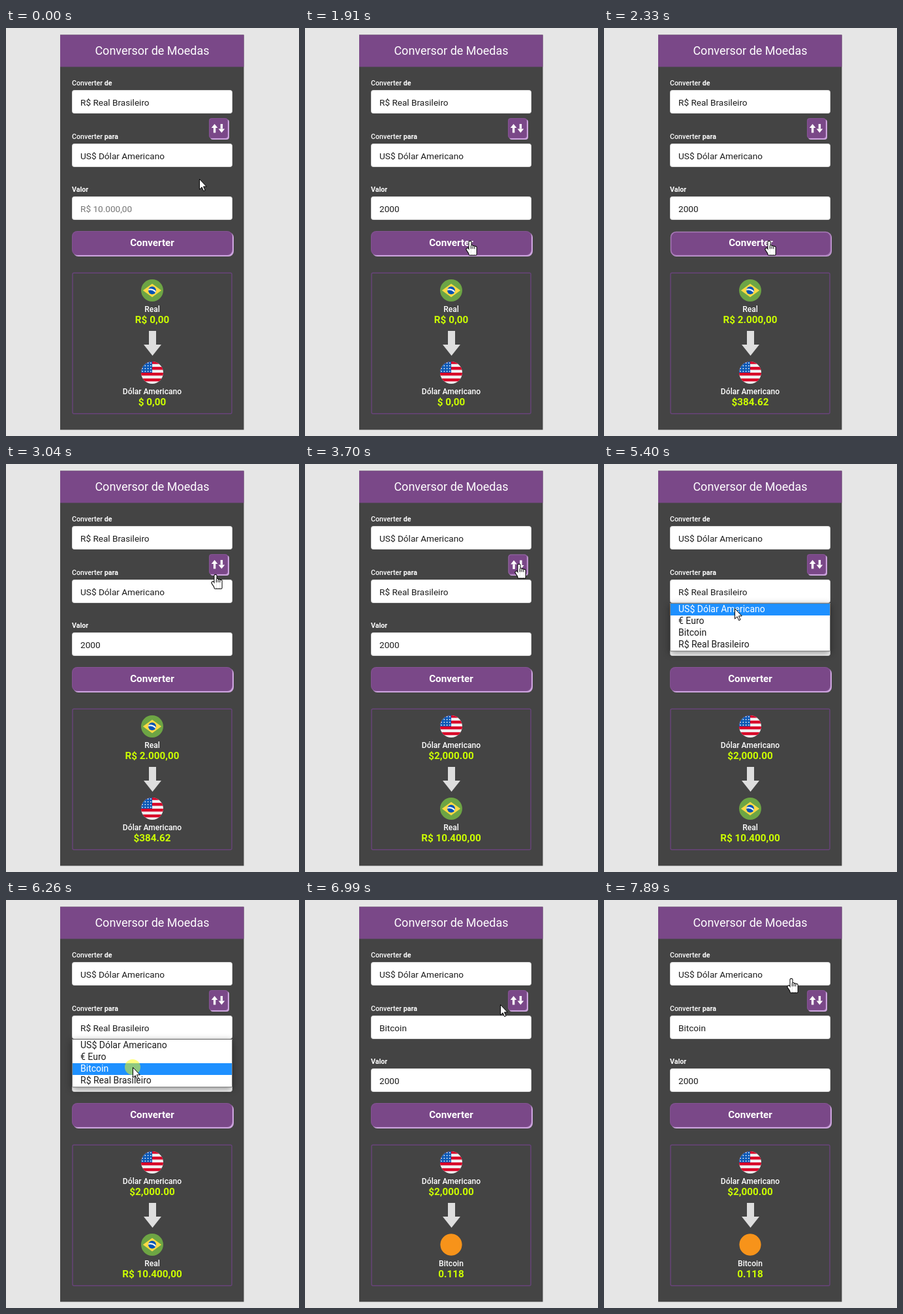
These frames come from a looping animation (449 px wide and 625 px high, 8000 ms). An HTML page with a canvas:

```html
<!DOCTYPE html>
<html lang="pt-BR">
<head>
<meta charset="utf-8">
<title>Conversor de Moedas</title>
<style>
  html, body { margin: 0; width: 100%; height: 100%; overflow: hidden; background: #e6e6e6; }
  canvas { display: block; }
</style>
</head>
<body>
<canvas id="stage" width="449" height="625"></canvas>
<script>
const ctx = document.getElementById('stage').getContext('2d');
const LOOP = 8000;
const PURPLE = '#7a4888', LILAC = '#cda4de', LIME = '#ccff00', INK = '#1c1c1c';
const LEFT = 101, WIDTH = 246, MID = 224;

const CURRENCY = {
  usd: { option: 'US$ Dólar Americano', name: 'Dólar Americano', icon: flagUS },
  eur: { option: '€ Euro' },
  btc: { option: 'Bitcoin', name: 'Bitcoin', icon: coin },
  brl: { option: 'R$ Real Brasileiro', name: 'Real', icon: flagBR }
};
const OPTIONS = Object.values(CURRENCY);

// Moments of the story, in ms
const TYPE = [210, 670, 1000, 1340], BLUR = 1840;
const CONVERT = { down: 2180, up: 2330 };
const SWAP = { down: 3500, up: 3630 };
const OPEN = { down: 4860, up: 5000 };
const PICK = { down: 6260, up: 6390 };

// Pointer path; bow is the sideways swing halfway
const START = [296, 231];
const MOVES = [
  { from: 80, till: 210, to: [296, 233] },
  { from: 1660, till: 1910, to: [253, 326] },
  { from: 2640, till: 3220, to: [328, 153] },
  { from: 4290, till: 4430, to: [206, 189] },
  { from: 5270, till: 5930, to: [194, 256] },
  { from: 6730, till: 7380, to: [286, 119], bow: [48, 0] },
  { from: 7530, till: 7890, to: [287, 120], bow: [22, 30] }
];
const SAMPLE = 64;

const easeOut = u => 1 - (1 - u) * (1 - u);

function pointer(t) {
  let pos = START;
  for (const { from, till, to, bow = [0, 0] } of MOVES) {
    if (t < from) break;
    const n = Math.round((till - from) / SAMPLE);
    const k = Math.min(n, Math.floor((t - from) / (till - from) * n + .05));
    const u = easeOut((k + 1) / (n + 1));
    pos = pos.map((p, i) => p + (to[i] - p) * u + bow[i] * 4 * u * (1 - u));
  }
  return pos;
}

function text(str, x, y, size, color, weight = 400, align = 'left') {
  ctx.font = `${weight} ${size}px Roboto, Arial, sans-serif`;
  ctx.textAlign = align;
  ctx.fillStyle = color;
  ctx.fillText(str, x, y);
  return ctx.measureText(str).width;
}

function rect(x, y, w, h, fill) {
  ctx.fillStyle = fill;
  ctx.fillRect(x, y, w, h);
}

function box(x, y, w, h, r, fill, stroke, width = 1) {
  ctx.beginPath();
  ctx.roundRect(x, y, w, h, r);
  if (fill) { ctx.fillStyle = fill; ctx.fill(); }
  if (stroke) { ctx.strokeStyle = stroke; ctx.lineWidth = width; ctx.stroke(); }
}

function disc(x, y, r, fill) {
  ctx.beginPath();
  ctx.arc(x, y, r, 0, Math.PI * 2);
  ctx.fillStyle = fill;
  ctx.fill();
}

// Arrow from its tail to its tip; a negative length points up
function arrow(x, tail, length, stem, head, headLength, fill) {
  const tip = tail + length, neck = tip - Math.sign(length) * headLength;
  rect(x - stem / 2, tail, stem, neck - tail, fill);
  ctx.beginPath();
  ctx.moveTo(x - head / 2, neck);
  ctx.lineTo(x + head / 2, neck);
  ctx.lineTo(x, tip);
  ctx.fill();
}

// Round icons are painted in a unit circle
function badge(y, paint) {
  ctx.save();
  ctx.translate(MID, y);
  ctx.scale(17, 17);
  ctx.beginPath();
  ctx.arc(0, 0, 1, 0, Math.PI * 2);
  ctx.clip();
  paint();
  ctx.restore();
}

function flagUS() {
  const band = 2 / 7.67, star = 1 / 4;
  rect(-1, -1, 2, 2, '#f0f0f0');
  for (let i = -2; i < 2; i++) rect(-1, (2 * i + 1) * band - 2 * band / 2 + band - band, 2, band, '#d80027');
  rect(-1, -1, 1, 1, '#0a58b6');
  for (let i = 0; i < 16; i++)
    disc(-1 + (i % 4 + .5) * star, -1 + (Math.floor(i / 4) + .5) * star, .055, '#f0f0f0');
}

function flagBR() {
  rect(-1, -1, 2, 2, '#6da544');
  ctx.beginPath();
  for (let i = 0; i < 4; i++)
    ctx.lineTo(.83 * Math.cos(i * Math.PI / 2), .61 * Math.sin(i * Math.PI / 2));
  ctx.fillStyle = '#ffda44';
  ctx.fill();
  disc(0, 0, .35, '#0052b4');
  ctx.clip();
  ctx.beginPath();
  ctx.arc(-.17, .56, .65, 0, Math.PI * 2);
  ctx.strokeStyle = '#f0f0f0';
  ctx.lineWidth = .13;
  ctx.stroke();
}

function coin() {
  disc(0, 0, .98, '#f7931a');
}

function field(y, str, color = INK) {
  box(LEFT + .5, y + .5, WIDTH - 1, 35, 3, '#fff', '#dcdcdc');
  text(str, 114, y + 24, 13.6, color);
}

function label(y, bold, plain = '') {
  const w = plain ? text(plain, LEFT, y, 10.7, '#fff', 500) : 0;
  text(bold, LEFT + w, y, 10.7, '#fff', 700);
}

// p runs from 0 (raised) to 1 (pressed)
function button(x, y, w, h, r, p) {
  const drop = 2 * (1 - p);
  if (drop) box(x + 2, y + 2, w, h, r, LILAC);
  box(x + p, y + p, w, h, r, PURPLE);
  box(x + p + .5, y + p + .5, w - 1, h - 1, r, null, `rgba(205,164,222,${.12 + .45 * p})`, 1 + p * .6);
}

function pressed(t, { down, up }) {
  if (t < down) return 0;
  return t < up ? Math.min(1, .5 + (t - down) / 140) : Math.max(0, 1 - (t - up) / 130);
}

function swapButton(p) {
  button(311, 138, 29, 31, 4, p);
  arrow(319.6 + p, 160.5 + p, -13.5, 3.4, 9.6, 6, '#fff');
  arrow(330.4 + p, 147 + p, 13.5, 3.4, 9.6, 6, '#fff');
}

function result(y, cur, amount) {
  badge(y, cur.icon);
  text(cur.name, MID, y + 33, 12.1, '#fff', 500, 'center');
  text(amount, MID, y + 50, 15.25, LIME, 700, 'center');
}

const LIST = { y: 213, row: 18 };

function dropdown(y) {
  const row = Math.floor((y - LIST.y - 1) / LIST.row);
  const hot = row >= 0 && row < 4 ? row : 3;
  ctx.save();
  ctx.shadowColor = 'rgba(0,0,0,.45)';
  ctx.shadowBlur = 10;
  ctx.shadowOffsetY = 3;
  rect(LEFT, LIST.y, WIDTH, 74, '#fff');
  ctx.restore();
  box(LEFT + .5, LIST.y + .5, WIDTH - 1, 73, 0, '#fff', '#7c7c7c');
  OPTIONS.forEach((cur, i) => {
    const top = LIST.y + 1 + i * LIST.row;
    if (i === hot) rect(LEFT + 1, top, WIDTH - 2, LIST.row, '#1e90ff');
    text(cur.option, 114, top + 13, 14, i === hot ? '#fff' : INK);
  });
}

function line(width, color, ...points) {
  ctx.beginPath();
  points.forEach(([x, y]) => ctx.lineTo(x, y));
  ctx.lineWidth = width;
  ctx.strokeStyle = color;
  ctx.stroke();
}

function arrowCursor() {
  const shape = new Path2D('M.5 .5V16.2L4.1 12.8L6.7 18.6L9.1 17.5L6.5 11.9H11.3Z');
  ctx.fillStyle = '#fff';
  ctx.fill(shape);
  ctx.lineWidth = 1;
  ctx.stroke(shape);
}

// Four fingers and a thumb, outlined by a wider black pass
function handCursor() {
  const gap = 2.7;
  ctx.lineCap = 'round';
  for (const [width, color] of [[5, '#000'], [3, '#fff']]) {
    for (let i = 0; i < 4; i++)
      line(width, color, [i * gap, i ? 7.6 + i * .9 : 2.2], [i * gap, 20.3]);
    line(width, color, [-4, 13], [0, 19]);
  }
  for (let i = 0; i < 3; i++)
    line(1, '#000', [(i + .5) * gap, 7.5 + i * .9], [(i + .5) * gap, 12]);
}

function beamCursor() {
  line(1, '#000', [.5, -8], [.5, 8]);
  for (const y of [-8, 8]) line(1, '#000', [-2, y + .5], [3, y + .5]);
}

function cursorAt(x, y, listOpen) {
  const over = (l, t, w, h) => x >= l && x <= l + w && y >= t && y <= t + h;
  if (listOpen && y > LIST.y) return arrowCursor;
  if (over(LEFT, 95, WIDTH, 36) || over(LEFT, 177, WIDTH, 36) ||
      over(LEFT, 311, WIDTH, 38) || over(311, 138, 30, 32)) return handCursor;
  return over(LEFT, 258, WIDTH, 36) ? beamCursor : arrowCursor;
}

function cursor(x, y, paint) {
  ctx.save();
  ctx.translate(Math.round(x), Math.round(y));
  ctx.strokeStyle = '#000';
  ctx.lineJoin = 'round';
  paint();
  ctx.restore();
}

function amounts(t) {
  if (t >= PICK.up) return ['$2,000.00', '0.118'];
  if (t >= SWAP.up) return ['$2,000.00', 'R$ 10.400,00'];
  if (t >= CONVERT.up) return ['R$ 2.000,00', '$384.62'];
  return ['R$ 0,00', '$ 0,00'];
}

function valueField(t) {
  const typed = TYPE.filter(k => t >= k).length;
  if (!typed) return field(258, 'R$ 10.000,00', '#757575');
  field(258, '2000'.slice(0, typed));
  if (t < BLUR) rect(Math.round(114 + typed * 7.64), 268, 1, 17, '#000');
}

function draw(t) {
  const [x, y] = pointer(t);
  const { usd, brl, btc } = CURRENCY;
  const listOpen = t >= OPEN.down && t < PICK.up;
  const swapped = t >= SWAP.up;
  const from = swapped ? usd : brl;
  const to = t >= PICK.up ? btc : swapped ? brl : usd;
  const [paid, got] = amounts(t);

  rect(0, 0, 449, 625, '#e6e6e6');
  rect(83, 10.5, 281.5, 605, '#444');
  rect(83, 10.5, 281.5, 49, PURPLE);
  text('Conversor de Moedas', MID, 41, 18, '#fff', 400, 'center');

  label(88, 'de', 'Converter ');
  field(95, from.option);
  label(170, 'para', 'Converter ');
  field(177, to.option);
  label(251, 'Valor');
  valueField(t);

  swapButton(pressed(t, SWAP));
  const p = pressed(t, CONVERT);
  button(LEFT, 311, WIDTH, 37, 8, p);
  text('Converter', MID + p, 333.5 + p * .6, 15.2, '#fff', 700, 'center');

  box(102, 375.2, 244, 215.6, 2, null, '#68437a', 1.4);
  result(402, from, paid);
  arrow(224.5, 464, 38, 11, 27, 17, '#dedede');
  result(528, to, got);

  if (listOpen) dropdown(y);
  if ([CONVERT, SWAP, OPEN, PICK].some(c => t >= c.down && t < c.up))
    disc(x, y, 12, 'rgba(255,255,0,.5)');
  cursor(x, y, cursorAt(x, y, listOpen));
}

const begin = performance.now();
function tick() {
  draw((performance.now() - begin) % LOOP);
  requestAnimationFrame(tick);
}
tick();
</script>
</body>
</html>
```
